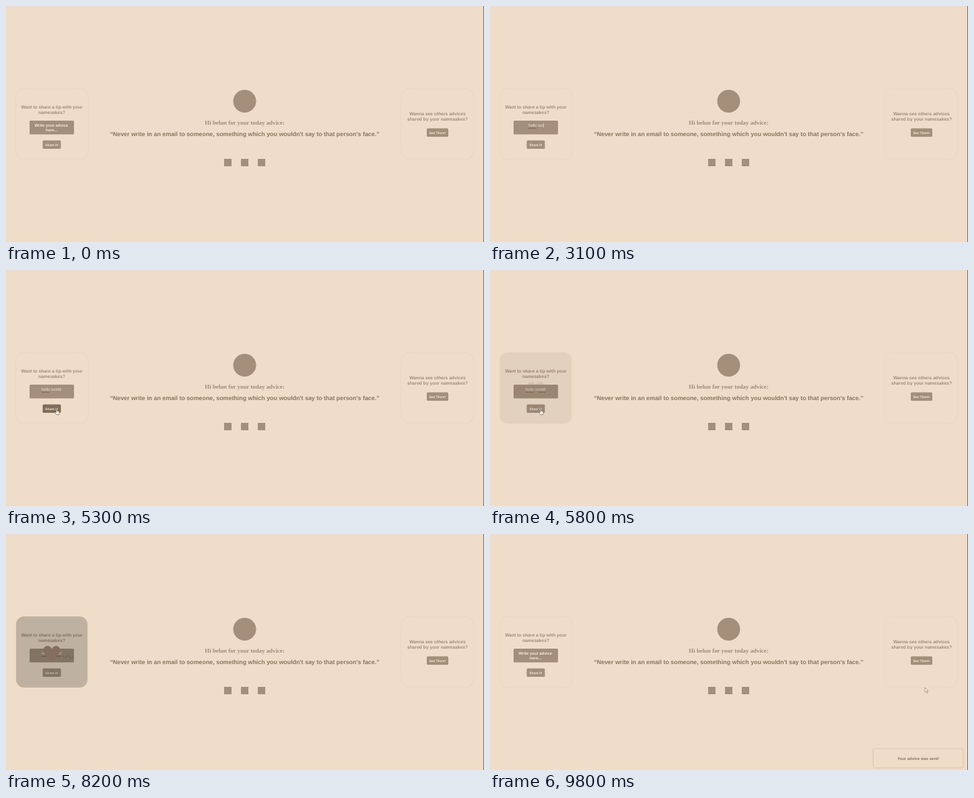
An HTML page for the animation above (9900 ms loop, 710 px wide and 352 px high).

```html
<!DOCTYPE html>
<html lang="en">
<head>
<meta charset="utf-8">
<title>Daily advice</title>
<style>
  html, body { margin: 0; width: 100%; height: 100%; overflow: hidden; background: #efddc9; }
  svg { display: block; width: 710px; height: 352px; }
  text { font-family: "Liberation Sans", Arial, sans-serif; font-weight: bold; text-anchor: middle; white-space: pre; text-rendering: geometricPrecision; }
  .card { fill: none; stroke: #ecd9c1; stroke-width: 1.4; }
  .title { font-size: 6.7px; fill: #a18c75; }
  .box { fill: #a38f7a; }
  .field { font-size: 5.95px; fill: #f5eadf; }
  .button { font-size: 4.85px; fill: #f5eadf; }
  .greeting { font-family: "Liberation Serif", "Times New Roman", serif; font-size: 8.85px; fill: #a18c75; }
  .quote { font-size: 8.88px; fill: #8b755f; }
  #typed { font-weight: normal; }
</style>
</head>
<body>
<svg viewBox="0 0 710 352">
  <rect width="710" height="352" fill="#efddc9"/>
  <rect x="709" width="1" height="352" fill="#75685a"/>

  <circle cx="354.5" cy="142" r="17" class="box"/>
  <text class="greeting" x="354.5" y="177">Hi belun for your today advice:</text>
  <text class="quote" x="354.5" y="194">“Never write in an email to someone, something which you wouldn't say to that person's face.”</text>
  <g class="box">
    <rect x="324" y="228" width="11" height="11"/>
    <rect x="349" y="228" width="11" height="11"/>
    <rect x="374" y="228" width="11" height="11"/>
  </g>

  <rect class="card" x="14.5" y="122.5" width="108" height="107" rx="14"/>
  <text class="title" x="68" y="153">Want to share a tip with your</text>
  <text class="title" x="68" y="160.7">namesakes?</text>
  <rect class="box" x="35" y="171" width="66" height="20.5" rx="1.5"/>
  <g id="placeholder" class="field">
    <text x="67.3" y="180.2">Write your advice</text>
    <text x="67.8" y="186.8">here...</text>
  </g>
  <text id="typed" class="field" x="68" y="180"></text>
  <rect id="caret" y="175" width=".7" height="6" fill="#f5eadf"/>
  <path id="spell" fill="none" stroke="#5f4a3e" stroke-width="1" stroke-dasharray="1.5 1"/>
  <rect id="share" class="box" x="54.5" y="200.5" width="27" height="12.5" rx="1.5"/>
  <text class="button" x="68" y="208.5">Share it!</text>

  <g id="overlay">
    <rect x="15" y="123" width="106" height="106" rx="12" fill="#000" fill-opacity=".2"/>
    <rect id="tint" x="35" y="171" width="66" height="20.5" rx="1.5" fill="#84604f"/>
    <path id="heart" fill="#836e5f" d="M0 10 C-4 6 -12 2 -12 -5 C-12 -13 -3 -13 0 -7 C3 -13 12 -13 12 -5 C12 2 4 6 0 10Z"/>
    <path id="specks" fill="none" stroke="#493a31" stroke-dasharray="1.2 2.2" d="M85 182l4 2l4 -3l3 4l4 -2"/>
  </g>

  <rect class="card" x="586.5" y="122.5" width="108" height="107" rx="14"/>
  <text class="title" x="641" y="163">Wanna see others advices</text>
  <text class="title" x="641" y="170.7">shared by your namesakes?</text>
  <rect class="box" x="625" y="182.5" width="32" height="12.5" rx="1.5"/>
  <text class="button" x="641" y="190.5">See There!</text>

  <g id="toast">
    <rect x="569" y="320.5" width="134" height="28.5" rx="3" fill="none" stroke="#dfcbb5" stroke-opacity=".45" stroke-width="3"/>
    <rect x="569.5" y="320.5" width="133" height="28" rx="3" fill="#efddc9" stroke="#ddc9b3" stroke-width=".8"/>
    <text x="636" y="336.6" font-size="5.95" fill="#8b755f">Your advice was sent!</text>
  </g>

  <path id="arrow" fill="#f3e8da" stroke="#8f7d6b" stroke-width=".6" d="M0 0V7.2L1.8 5.6L3 8.3L4.1 7.8L3 5.2H5.2Z"/>
  <path id="hand" fill="#fff7ec" stroke="#5c4d40" stroke-width=".6" d="M0 .7Q.8 -.4 1.5 .7V3.2L4.6 4V6.4L3.8 8.8H.6L-1.8 5.4L-1.2 4.7L0 5.4Z"/>
</svg>
<script>
const LOOP = 9900, STEP = 100;
const $ = id => document.getElementById(id);
const show = (id, opacity) => $(id).setAttribute("opacity", Number(opacity));
const move = (id, x, y, scale = 1) =>
  $(id).setAttribute("transform", `translate(${x} ${y}) scale(${scale})`);
const within = (t, from, to) => t >= from && t < to;

const MESSAGE = "hello world!";
const keyTimes = [1700, 1900, 2100, 2300, 2500, 2700, 3000, 3100, 3700, 4000, 4200, 4700];

// Pointer journeys: rows of time, x, y.
const journeys = [
  { shape: "arrow", end: 600, path: [[200, 210, 199], [300, 172, 197], [400, 122, 193], [600, 69, 188]] },
  { shape: "hand", end: 7600, path: [[5100, 73, 181], [5200, 74, 197], [5300, 74.5, 207], [7000, 74.5, 207], [7600, 113, 215]] },
  { shape: "hand", end: 8700, path: [[8300, 74.5, 207], [8600, 74.5, 207], [8700, 80, 207]] },
  { shape: "arrow", end: LOOP, path: [[8700, 80, 207], [8800, 85, 208], [9000, 230, 244], [9300, 570, 318], [9500, 640, 331], [9600, 643, 300], [9700, 646, 248], [9800, 646, 229]] }
];

function along(path, t) {
  const next = path.findIndex(row => row[0] > t);
  if (next < 0) return path[path.length - 1].slice(1);
  const [t0, x0, y0] = path[next - 1], [t1, x1, y1] = path[next];
  const k = (t - t0) / (t1 - t0);
  return [x0 + (x1 - x0) * k, y0 + (y1 - y0) * k];
}

function drawField(t) {
  const sent = t >= 8300;
  const count = sent ? 0 : keyTimes.filter(key => key <= t).length;
  const typed = $("typed");
  typed.textContent = MESSAGE.slice(0, count);
  const width = count ? typed.getComputedTextLength() : 0;
  const left = 68 - width / 2;
  show("placeholder", !count);
  $("caret").setAttribute("x", left + width);
  show("caret", within(t, 800, 1300) || within(t, 1700, 4800));
  const worldMark = t >= 5700 ? `M${left + 20} 182.3h10` : "";
  $("spell").setAttribute("d", `M${left} 182.3h11.5${worldMark}`);
  show("spell", within(t, 3000, 8300));
}

function drawOverlay(t) {
  const fade = Math.min(1, Math.max(0, (t - 5600) / 800));
  show("overlay", within(t, 5700, 8300) ? fade : 0);
  const beat = Math.max(0, Math.cos((t - 7000) / 1200 * 2 * Math.PI));
  show("tint", t < 7700 ? beat * 0.3 : 0);
  move("heart", 68, 178.5, 0.97 + beat * 0.05);
  show("specks", t >= 7700);
}

function drawPointer(t) {
  show("arrow", 0);
  show("hand", 0);
  const journey = journeys.find(j => within(t, j.path[0][0], j.end));
  if (!journey) return;
  move(journey.shape, ...along(journey.path, t));
  show(journey.shape, 1);
}

function render(t) {
  drawField(t);
  drawOverlay(t);
  drawPointer(t);
  const hovered = within(t, 5200, 5700) || within(t, 8300, 8700);
  $("share").style.fill = hovered ? "#7e6b58" : "";
  show("toast", t >= 8600 ? Math.min(1, (t - 8500) / 200) : 0);
}

function tick() {
  render(Math.floor(performance.now() % LOOP / STEP) * STEP);
  requestAnimationFrame(tick);
}
tick();
</script>
</body>
</html>
```
